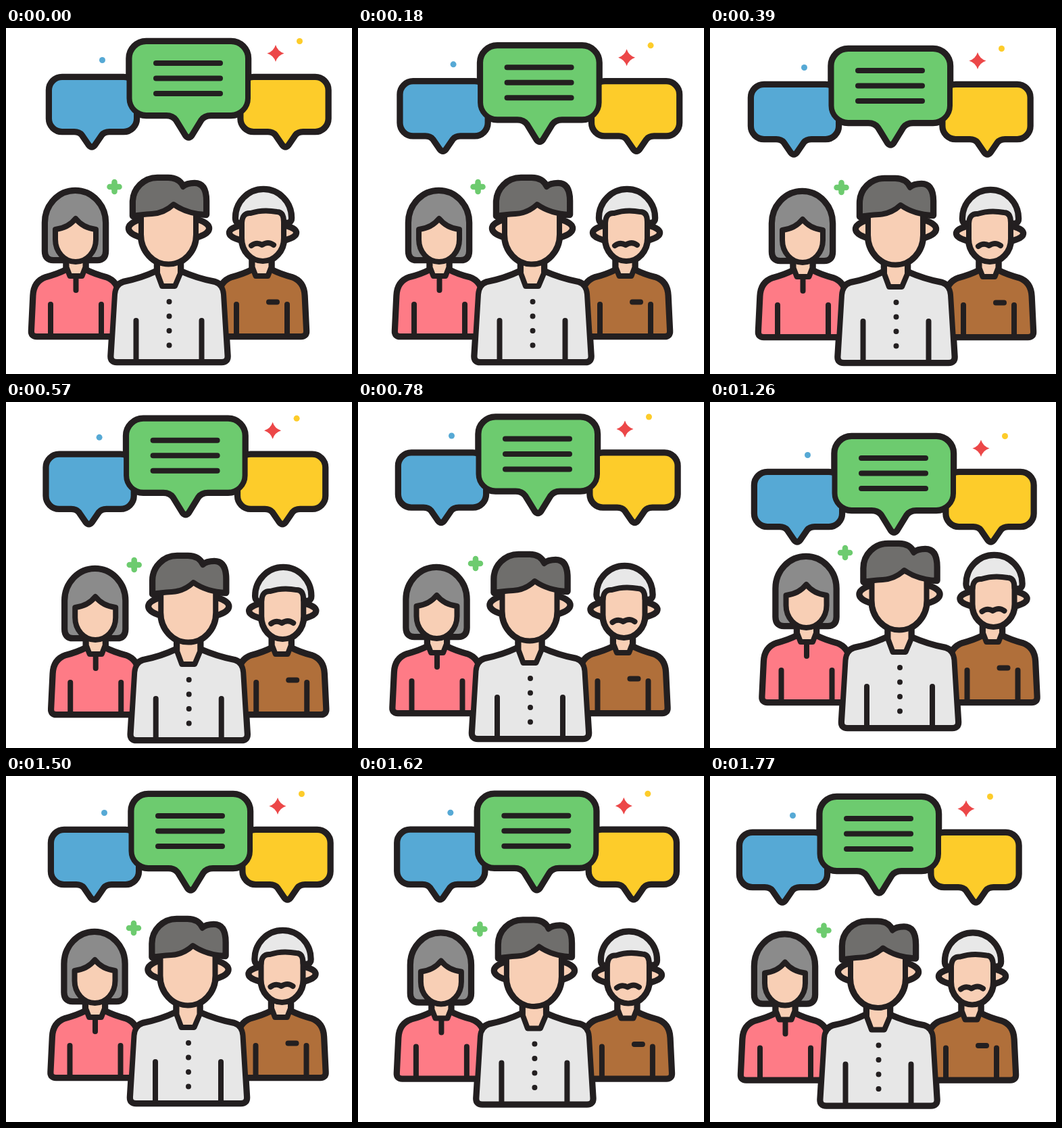
Recreate the animation shown at these times as an HTML page. Size 512 by 512 pixels, loop 1.8 s.

```html
<!DOCTYPE html>
<html lang="en">
<head>
<meta charset="utf-8">
<title>Group discussion</title>
<style>
  html, body { margin: 0; height: 100%; overflow: hidden; background: #fff; }
  svg { display: block; width: 100vw; height: 100vh; }
  .ink { stroke: #231f20; stroke-linecap: round; stroke-linejoin: round; }
  .thin { stroke-width: 8; }
  .rim { stroke-width: 10.500; }
  .line { fill: none; }
  .skin { fill: #f8cfb5; }
</style>
</head>
<body>
<svg viewBox="0 0 512 512">
  <defs>
    <g id="bubbles"></g>

    <g id="torso">
      <path d="M-58 456H58Q66 456 65.500 448L63 396Q62 375 44 369Q28 365 14 358H-14Q-28 365 -44 369Q-62 375 -63 396L-65.500 448Q-66 456 -58 456Z"/>
      <path class="line" d="M-37.500 409V453M37.500 409V453"/>
      <path class="skin" d="M-14 338V354L-9 367H9L14 354V338"/>
    </g>

    <g id="people">
      <!-- woman -->
      <path fill="#8b8b8b" d="M70 343Q58 343 58 330V288A44.500 47 0 0 1 147 288V330Q147 343 135 343Z"/>
      <use href="#torso" x="103.500" fill="#fe7b86"/>
      <path class="line" d="M103.500 368V388"/>
      <path class="skin" d="M73 298Q92 296 103 282Q114 296 133 298V313A30 33 0 0 1 73 313Z"/>

      <!-- older man -->
      <use href="#torso" x="378.500" fill="#b06f3a"/>
      <path class="line" d="M389 405.500H401"/>
      <ellipse class="skin" cx="380" cy="303" rx="49" ry="14"/>
      <rect class="skin" x="349" y="244" width="62" height="101" rx="31" ry="34"/>
      <path fill="#e8e8e8" d="M349 288Q340 290 340 281A41 42 0 0 1 422 281Q422 290 411 287Q411 272 401 272Q380 268 362 274Q350 273 349 288Z"/>
      <path class="line" d="M363 322Q371 316 379 321Q388 315 396 321"/>

      <!-- speaker -->
      <path fill="#e7e7e7" d="M164 494H319Q328 494 327.500 485L322 394Q321 380 309 376Q283 371 258 360H223Q200 371 174 376Q162 380 161 394L155.500 485Q155 494 164 494Z"/>
      <path class="line" d="M192.500 433V490M289.500 433V490"/>
      <path class="line" stroke-dasharray="0 21.500" d="M241.500 405V470"/>
      <path class="skin" d="M224 338V363L231 382H250L258 363V338"/>
      <ellipse class="skin" cx="241" cy="296.500" rx="59" ry="18"/>
      <rect class="skin" x="200" y="228" width="81" height="121.500" rx="40.500" ry="44"/>
      <path fill="#6f6e6c" d="M188 278V258A36 36 0 0 1 224 222H240Q256 222 262 235Q268 230 279 230Q296 230 296 256V276Q268 275 248 261Q234 274 216 275Q200 276 188 278Z"/>
    </g>
  </defs>

  <g id="talk">
    <use href="#bubbles" class="ink rim"/>
    <use href="#bubbles" class="ink thin"/>
    <path fill="#ec4748" d="M399 25Q402 34.500 411.500 37.500Q402 40.500 399 50Q396 40.500 386.500 37.500Q396 34.500 399 25Z"/>
    <circle cx="142.500" cy="47.500" r="4.500" fill="#56a9d5"/>
    <circle cx="434.500" cy="19.500" r="4.500" fill="#fdcc2a"/>
  </g>

  <g id="crowd">
    <g fill="#6dcb6f" stroke="#6dcb6f" stroke-width="8.500" stroke-linecap="round">
      <path d="M153.500 235H167.500M160.500 228V242"/>
      <circle cx="160.500" cy="235" r="6" stroke="none"/>
    </g>
    <use href="#people" class="ink rim"/>
    <use href="#people" class="ink thin"/>
  </g>
</svg>
<script>
  const LOOP = 1800, STEP = 30;
  const find = id => document.getElementById(id);

  // Rounded box with a tail: centre x, top, size, corner, half tail width, tail depth, tail shift
  function bubble(fill, cx, top, w, h, r, half, depth, shift = 0) {
    const left = cx - w / 2, base = top + h, tip = cx + shift;
    const arc = (x, y) => `a${r} ${r} 0 0 1 ${x * r} ${y * r}`;
    return `<path fill="${fill}" d="M${left + r} ${top}h${w - 2 * r}${arc(1, 1)}v${h - 2 * r}${arc(-1, 1)}
      H${tip + half}Q${tip + half * 0.7} ${base} ${tip + half * 0.55} ${base + depth / 5}
      L${tip + 4} ${base + depth - 5}Q${tip} ${base + depth} ${tip - 4} ${base + depth - 5}
      L${tip - half * 0.55} ${base + depth / 5}Q${tip - half * 0.7} ${base} ${tip - half} ${base}
      H${left + r}${arc(-1, -1)}v${2 * r - h}${arc(1, -1)}Z"/>`;
  }

  find("bubbles").innerHTML =
    bubble("#56a9d5", 128.5, 73, 129, 80, 19, 26, 25, -1.5) +
    bubble("#fdcc2a", 412, 73, 129, 80, 19, 26, 25, 1.5) +
    bubble("#6dcb6f", 270.25, 20, 175.5, 109, 25, 33, 35) +
    [0, 1, 2].map(i => `<path d="M222 ${52 + i * 22.5}H317"/>`).join("");

  // Wandering paths through a few points: [ms, x, y]
  const drift = {
    talk: [[0, 0, 0], [390, -3, 11], [690, -5, 0], [780, -4, 2.5], [1020, 0, 30],
      [1260, 2, 31], [1500, 3, 7], [1770, -20, 11]],
    crowd: [[0, 0, 0], [390, 34, 1], [540, 31, 6], [780, 13.5, 4], [900, 11, 8.5],
      [1020, 13, 4], [1260, 39.5, -12], [1500, 28.5, -10], [1770, 8, -6.5]]
  };

  // Smooth curve through the points
  function sample(keys, t, axis) {
    const last = keys.length - 1;
    let i = 0;
    while (i < last - 1 && keys[i + 1][0] <= t) i++;
    const slope = k => {
      const a = keys[Math.max(k - 1, 0)], b = keys[Math.min(k + 1, last)];
      return (b[axis] - a[axis]) / (b[0] - a[0]);
    };
    const [a, b] = [keys[i], keys[i + 1]];
    const span = b[0] - a[0], u = (t - a[0]) / span, v = 1 - u;
    return v * v * ((1 + 2 * u) * a[axis] + u * span * slope(i))
      + u * u * ((3 - 2 * u) * b[axis] - v * span * slope(i + 1));
  }

  function draw(now) {
    const t = Math.floor((now % LOOP) / STEP) * STEP;
    for (const [id, keys] of Object.entries(drift))
      find(id).setAttribute("transform", `translate(${sample(keys, t, 1)} ${sample(keys, t, 2)})`);
  }

  const start = performance.now();
  function tick() {
    draw(performance.now() - start);
    requestAnimationFrame(tick);
  }
  tick();
</script>
</body>
</html>
```
